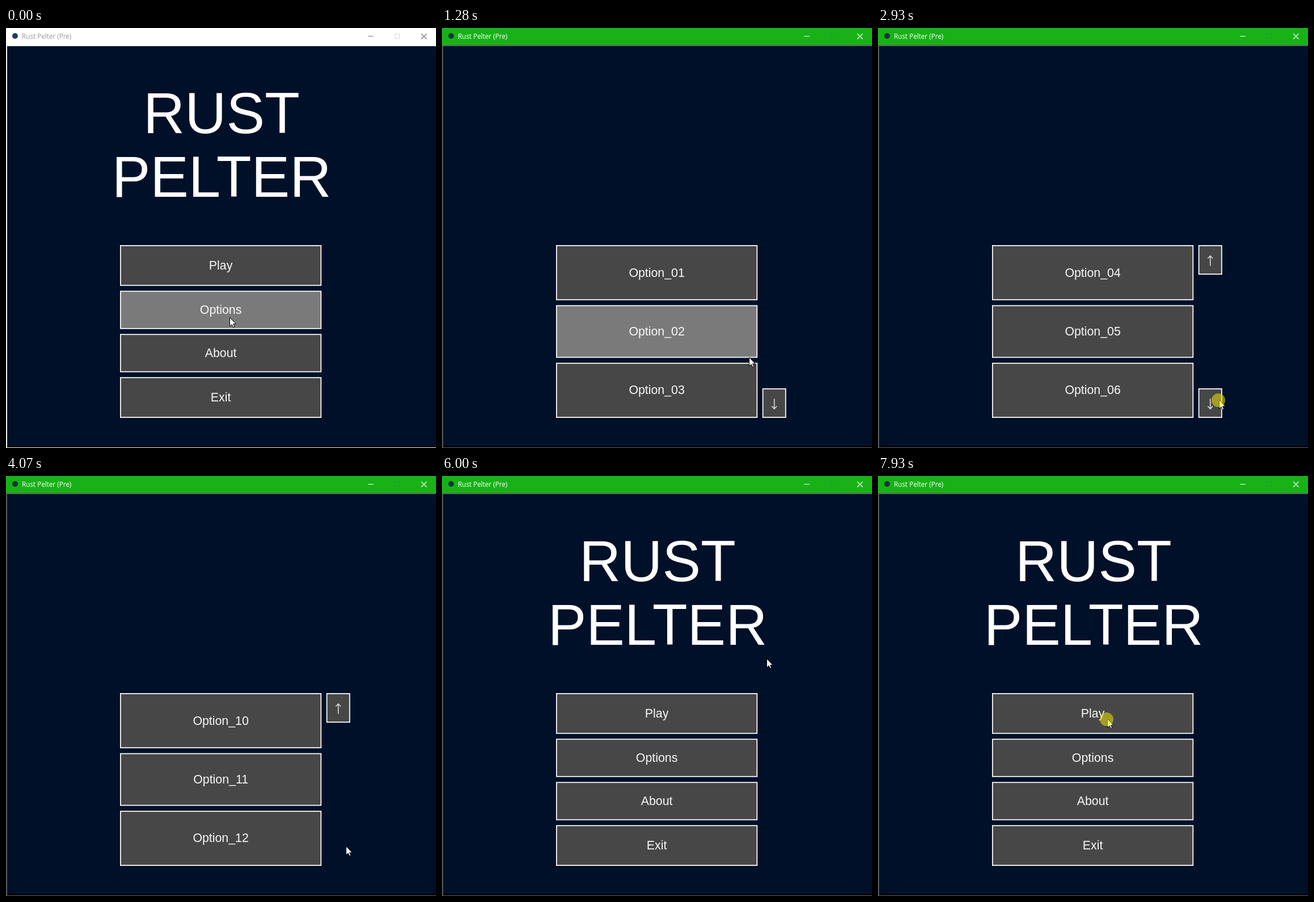
Write an HTML page with a canvas that moves like this. It is 758x739 px and loops after 8 s.

```html
<!DOCTYPE html>
<html lang="en">
<head>
<meta charset="utf-8">
<title>Rust Pelter</title>
<style>
html, body { margin: 0; width: 100%; height: 100%; overflow: hidden; background: #001029; }
canvas { display: block; }
</style>
</head>
<body>
<canvas id="stage" width="758" height="739"></canvas>
<script>
const ctx = document.getElementById('stage').getContext('2d');
const LOOP = 8000, CLICK = 70, TURN = 30, ESCAPE = 6000;
const MENU = -1, LAST = 3;
const ARIAL = '"Liberation Sans", Arial, sans-serif';
const UI = '"Open Sans", "Noto Sans", sans-serif';

// Pointer strokes: each eases to x, y, bowing sideways by bend
const home = { x: 394, y: 509 };
const strokes = [
  { from: 800, to: 1280, x: 541, y: 579, bend: 60 },
  { from: 1280, to: 1560, x: 531, y: 559, bend: 0 },
  { from: 1600, to: 1640, x: 524, y: 541, bend: 0 },
  { from: 1840, to: 2230, x: 601, y: 654, bend: -60 },
  { from: 4040, to: 4480, x: 581, y: 420, bend: -40 },
  { from: 4870, to: 5190, x: 572, y: 321, bend: 0 },
  { from: 6840, to: 7700, x: 404, y: 427, bend: -80 }
];

// Clicks, the page each one opens, and how long the button stays dim
const clicks = [
  { at: 90, page: 0 }, { at: 2390, page: 1 }, { at: 2930, page: 2 }, { at: 3330, page: 3 },
  { at: 4540, page: 2, dim: 240 }, { at: 4780, page: 1 }, { at: 7930, page: MENU }
];

const during = (t, from, length) => t >= from && t < from + length;

function pointerAt(t) {
  let { x, y } = home;
  for (const s of strokes) {
    if (t < s.from) break;
    const k = Math.min(1, (t - s.from) / (s.to - s.from));
    const ease = k * k * (3 - 2 * k);
    const dx = s.x - x, dy = s.y - y;
    const bow = s.bend * Math.sin(Math.PI * ease) / Math.hypot(dx, dy);
    x += dx * ease - dy * bow;
    y += dy * ease + dx * bow;
  }
  return [Math.round(x), Math.round(y)];
}

function pageAt(t) {
  if (t >= ESCAPE) return MENU;
  return clicks.reduce((page, c) => t >= c.at + TURN ? c.page : page, MENU);
}

function text(str, x, y, size, color = '#fff', family = ARIAL, align = 'center') {
  ctx.font = `${size}px ${family}`;
  ctx.textAlign = align;
  ctx.fillStyle = color;
  ctx.fillText(str, x, y);
}

function rect(x, y, w, h, color) {
  ctx.fillStyle = color;
  ctx.fillRect(x, y, w, h);
}

function disc(x, y, r, color) {
  ctx.fillStyle = color;
  ctx.beginPath();
  ctx.arc(x, y, r, 0, 7);
  ctx.fill();
}

function lines(color, width, ...polys) {
  ctx.strokeStyle = color;
  ctx.lineWidth = width;
  ctx.beginPath();
  for (const poly of polys) poly.forEach(([x, y], i) => i ? ctx.lineTo(x, y) : ctx.moveTo(x, y));
  ctx.stroke();
}

function drawWindow(focused) {
  const ink = focused ? '#fff' : '#777';
  rect(0, 0, 758, 739, focused ? '#5c5f62' : '#f2f5f5');
  rect(0, 0, 758, 30, focused ? '#18b218' : '#fff');
  rect(2, 32, 756, 706, '#001029');
  rect(2, 735, 756, 3, '#00040c');
  disc(16, 14, 5, focused ? '#12343a' : '#1d3c5c');
  text('Rust Pelter (Pre)', 28, 18.5, 11.7, focused ? '#fff' : '#999', UI, 'left');
  lines(ink, 1, [[638, 14.5], [648, 14.5]]);
  lines(ink, 1.1, [[732, 10], [741.5, 19.5]], [[741.5, 10], [732, 19.5]]);
  ctx.strokeStyle = focused ? '#14a52a' : '#ddd';
  ctx.strokeRect(685.5, 10.5, 8, 8);
}

function drawButton({ x, y, w, h, label, arrow }, lit) {
  const edge = 1.8;
  rect(x, y, w, h, '#f8f8f8');
  rect(x + edge, y + edge, w - 2 * edge, h - 2 * edge, lit ? '#7a7a7a' : '#474747');
  if (label) text(label, x + w / 2, Math.round(y + h / 2 + 7), 21.33, '#f8f8f8');
  if (arrow) {
    const cx = x + w / 2, cy = y + h / 2 + 1.5, tip = cy + 9.5 * arrow, wing = tip - 5.5 * arrow;
    lines('#e4e4e4', 1.5, [[cx, cy - 9 * arrow], [cx, tip]],
      [[cx - 4.5, wing], [cx, tip - arrow], [cx + 4.5, wing]]);
  }
}

// Shares the column's height evenly, with a gap between neighbours
function column(labels) {
  const top = 382, pitch = 304 / labels.length, gap = 8.6;
  return labels.map((label, i) => {
    const y = top + pitch * i + (i ? gap / 2 : 0);
    const end = top + pitch * (i + 1) - (i < labels.length - 1 ? gap / 2 : 0);
    return { x: 201, y, w: 355.2, h: end - y, label };
  });
}

function buttonsOn(page) {
  if (page === MENU) return column(['Play', 'Options', 'About', 'Exit']);
  const list = column([1, 2, 3].map(i => 'Option_' + String(page * 3 + i).padStart(2, '0')));
  const side = { x: 564.7, w: 42, h: 52 };
  if (page > 0) list.push({ ...side, y: 382, arrow: -1 });
  if (page < LAST) list.push({ ...side, y: 634, arrow: 1 });
  return list;
}

function drawPointer(x, y) {
  ctx.save();
  ctx.translate(x + .5, y + .5);
  const shape = new Path2D('M0 0V15.5L3.6 12.2L6 17L8.3 16L6.1 11.3H10.8Z');
  ctx.fillStyle = '#fff';
  ctx.fill(shape);
  ctx.lineJoin = 'round';
  ctx.lineWidth = 1;
  ctx.strokeStyle = '#000';
  ctx.stroke(shape);
  ctx.restore();
}

function draw(t) {
  const page = pageAt(t);
  const [px, py] = pointerAt(t);
  const dim = clicks.some(c => during(t, c.at, c.dim ?? CLICK));

  drawWindow(t >= clicks[0].at);
  if (page === MENU) {
    text('RUST', 380, 184.5, 101.33);
    text('PELTER', 380, 297, 101.33);
  }
  for (const b of buttonsOn(page)) {
    const over = during(px, b.x, b.w) && during(py, b.y, b.h);
    drawButton(b, over && !dim);
  }
  drawPointer(px, py);
  if (clicks.some(c => during(t, c.at, CLICK))) disc(px - 1, py + 1, 12, 'rgba(230,220,10,.58)');
}

let start;
function tick(now) {
  start ??= now;
  draw((now - start) % LOOP);
  requestAnimationFrame(tick);
}
requestAnimationFrame(tick);
</script>
</body>
</html>
```
